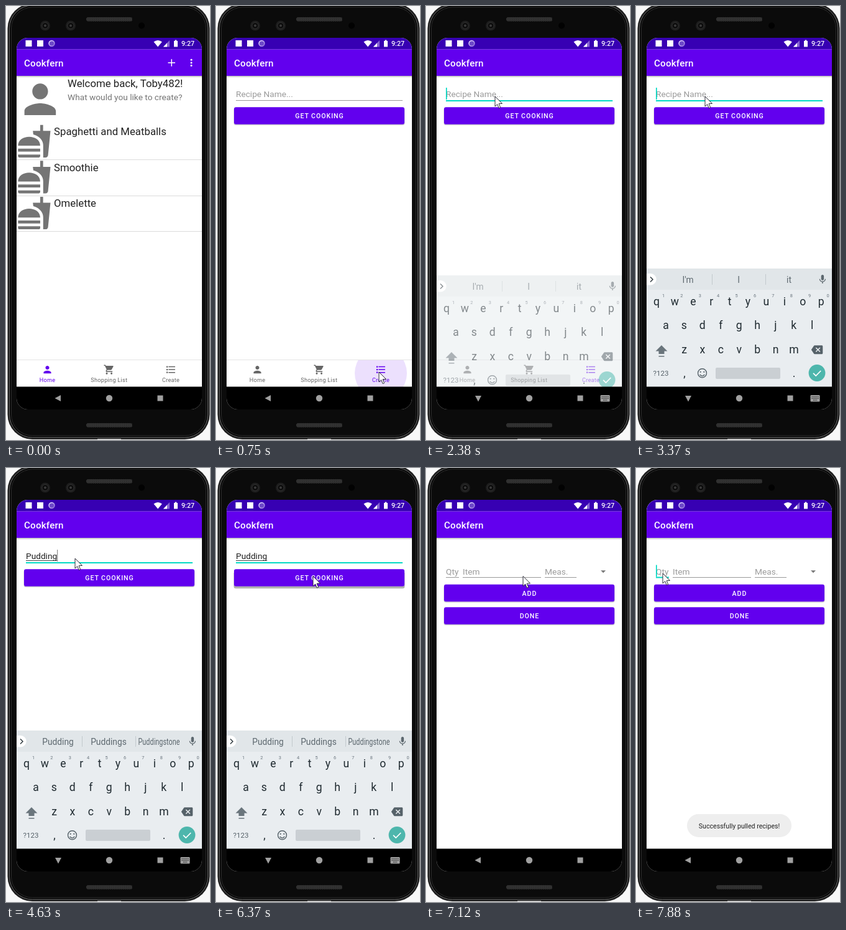
Recreate the animation shown at these times as an HTML page. Size 328 by 696 pixels, loop 8000 ms.

```html
<!DOCTYPE html>
<html lang="en">
<head>
<meta charset="utf-8">
<title>Recipe app</title>
<style>
  html, body { margin: 0; width: 100%; height: 100%; overflow: hidden; background: #fff; }
  svg { display: block; width: 328px; height: 696px; font-family: Roboto, sans-serif; }
  .bar { font-size: 15.18px; font-weight: 500; letter-spacing: .19px; fill: #fff; }
  .big { font-size: 16.8px; fill: #212121; }
  .field { font-size: 13.7px; fill: #212121; }
  .hint { fill: #9b9b9b; }
  .btn text { font-size: 10.62px; font-weight: 500; letter-spacing: .95px; fill: #fff; text-anchor: middle; }
  .btn .shadow { opacity: .18; }
  .pressed .shadow { opacity: .3; transform: translateY(2px); }
  .tab { fill: #666; }
  .tab.on { fill: #6200ee; }
  .tab text { font-size: 9.1px; letter-spacing: .3px; text-anchor: middle; }
  .key { font-size: 17.6px; fill: #1f2a30; text-anchor: middle; }
  .num { font-size: 7.4px; fill: #6a757e; text-anchor: middle; }
  .sug { font-size: 13.8px; fill: #5d686f; text-anchor: middle; }
  .grey { fill: #757575; }
  .line { stroke: #9a9a9a; stroke-width: 1; }
  .focus { stroke: #03dac5; stroke-width: 2; }
</style>
</head>
<body>
<svg viewBox="0 0 328 696">
  <defs>
    <clipPath id="screen"><rect x="17" y="51" width="298" height="596" rx="18"/></clipPath>
    <clipPath id="tabs-area"><rect x="17" y="568" width="298" height="43"/></clipPath>
    <linearGradient id="shade" x2="0" y2="1">
      <stop stop-color="#000" stop-opacity=".28"/><stop offset="1" stop-color="#000" stop-opacity="0"/>
    </linearGradient>
    <linearGradient id="ring" x2="1" y2="1">
      <stop stop-color="#e4dcff"/><stop offset="1" stop-color="#8a68d8"/>
    </linearGradient>
    <pattern id="mesh" width="3" height="3" patternUnits="userSpaceOnUse">
      <rect width="3" height="3" fill="#1c1c1c"/><path d="M0 0l3 3M3 0L0 3" stroke="#555" stroke-width=".6"/>
    </pattern>
    <path id="person" d="M12 12c2.21 0 4-1.79 4-4s-1.79-4-4-4-4 1.79-4 4 1.79 4 4 4zm0 2c-2.67 0-8 1.34-8 4v2h16v-2c0-2.66-5.33-4-8-4z"/>
    <path id="food" d="M18.06 22.99h1.66c.84 0 1.53-.64 1.63-1.46L23 5.05h-5V1h-1.97v4.05h-4.97l.3 2.34c1.71.47 3.31 1.32 4.27 2.26 1.44 1.42 2.43 2.89 2.43 5.29v8.05zM1 21.99V21h15.03v.99c0 .55-.45 1-1.01 1H2.01c-.56 0-1.01-.45-1.01-1zm15.03-7c0-8-15.03-8-15.03 0h15.03zM1.02 17h15v2h-15z"/>
    <path id="cart" d="M7 18c-1.1 0-1.99.9-1.99 2S5.9 22 7 22s2-.9 2-2-.9-2-2-2zM1 2v2h2l3.6 7.59-1.35 2.45c-.16.28-.25.61-.25.96 0 1.1.9 2 2 2h12v-2H7.42c-.14 0-.25-.11-.25-.25l.03-.12.9-1.63h7.45c.75 0 1.41-.41 1.75-1.03l3.58-6.49c.08-.14.12-.31.12-.48 0-.55-.45-1-1-1H5.21l-.94-2H1zm16 16c-1.1 0-1.99.9-1.99 2s.89 2 1.99 2 2-.9 2-2-.9-2-2-2z"/>
    <path id="list" d="M7 5h14v2H7zM7 11h14v2H7zM7 17h14v2H7zM2.5 4.5h3v3h-3zM2.5 10.5h3v3h-3zM2.5 16.5h3v3h-3z"/>
    <g id="appbar">
      <rect x="17" y="51" width="298" height="18.600" fill="#3700b3"/>
      <rect x="17" y="69.600" width="298" height="42.400" fill="#6200ee"/>
      <rect x="17" y="112" width="298" height="3" fill="url(#shade)"/>
      <text class="bar" x="29" y="96.600">Cookfern</text>
    </g>
  </defs>

  <!-- phone body -->
  <rect width="328" height="696" fill="#f8f8f8"/>
  <rect x="2.500" y="-4" width="325" height="699" rx="40" fill="#1e1e1e"/>
  <rect x="5.500" y="-1" width="319" height="693" rx="37" fill="#080808" stroke="#666"/>
  <rect x="8.500" y="2" width="313" height="687" rx="34" fill="#0b0b0b" stroke="#2c2c2c"/>
  <g fill="url(#mesh)">
    <rect x="129" y="18" width="74" height="6.500" rx="3"/>
    <rect x="129" y="669" width="74" height="6.500" rx="3"/>
  </g>
  <g id="cams"></g>
  <circle cx="218" cy="31.500" r="5" fill="#020202"/>
  <path d="M147 695h38" stroke="#ddd" stroke-width="1.500"/>

  <g clip-path="url(#screen)">
    <rect x="17" y="51" width="298" height="596" fill="#fff"/>
    <use href="#appbar"/>

    <g id="home">
      <path d="M260.500 91h11.500M266.250 85.250v11.500" stroke="#fff" stroke-width="1.500"/>
      <g fill="#fff"><circle cx="298" cy="86.300" r="1.500"/><circle cx="298" cy="90.900" r="1.500"/><circle cx="298" cy="95.500" r="1.500"/></g>
      <use href="#person" class="grey" transform="translate(17 111.700) scale(3.160)"/>
      <text class="big" x="99" y="130">Welcome back, Toby482!</text>
      <text class="field grey" x="99" y="151">What would you like to create?</text>
      <g id="rows"></g>
    </g>

    <g id="create">
      <line id="nameLine" x1="32" x2="300"/>
      <text id="name" class="field" x="32" y="146.300"></text>
      <path id="underscore" stroke="#333" stroke-width=".9"/>
      <rect id="caret" y="131" height="19"/>
      <g id="cook"></g>
    </g>

    <g id="tabs" clip-path="url(#tabs-area)">
      <rect x="17" y="568" width="298" height="43" fill="#fff"/>
      <circle id="ripple" cx="265" cy="589" fill="#6200ee" opacity=".12"/>
    </g>
    <rect x="17" y="567" width="298" height="1" fill="#e4e4e4"/>

    <g id="recipe">
      <rect x="17" y="51" width="298" height="560" fill="#fff"/>
      <use href="#appbar"/>
      <g class="field hint">
        <text x="32" y="170.500">Qty</text><text x="59" y="170.500">Item</text><text x="191" y="170.500">Meas.</text>
      </g>
      <path class="line" d="M59 175.500H185M191 175.500H242"/>
      <line id="qtyLine" x1="32" x2="53" y1="175.500" y2="175.500"/>
      <rect id="qtyCaret" x="32" y="155.500" width="1.700" height="19" fill="#03dac5"/>
      <path d="M281 164.200h8l-4 4z" fill="#777"/>
      <g id="actions"></g>
    </g>

    <g id="status" fill="#fff">
      <rect x="31.500" y="55" width="10" height="10"/>
      <rect x="50" y="55" width="10" height="10"/>
      <circle cx="73.500" cy="60" r="4.400" fill="#6c48c8" stroke="url(#ring)" stroke-width="1.700"/>
      <path d="M237.500 57.500q6.700-5 13.400 0L244.200 65.500z"/>
      <path d="M253 65.500h10v-10.500z" opacity=".4"/><path d="M253 65.500h6v-6.300z"/>
      <path d="M270 56h1.700v-1.500h2.600V56h1.700v9.500h-6z"/>
      <text x="282" y="64" font-size="10.700" font-weight="500">9:27</text>
    </g>

    <g id="keyboard">
      <rect x="17" y="421" width="298" height="190" fill="#e9edf0"/>
      <rect x="17" y="421" width="298" height="34" fill="#e1e6e9"/>
      <path d="M17 429h6.500a9.200 9.200 0 0 1 0 18.400H17z" fill="#fff"/>
      <path d="M23 434.500l4 4-4 4" fill="none" stroke="#333d43" stroke-width="1.500"/>
      <path d="M122.500 430v17M208.500 430v17" stroke="#c3c9cd"/>
      <g id="suggestions"></g>
      <path transform="translate(291 429.500) scale(.74)" fill="#5d686f" d="M12 14c1.660 0 3-1.340 3-3V5c0-1.660-1.340-3-3-3S9 3.340 9 5v6c0 1.660 1.340 3 3 3zm5.300-3c0 3-2.540 5.100-5.300 5.100S6.700 14 6.700 11H5c0 3.410 2.720 6.230 6 6.720V21h2v-3.280c3.280-.48 6-3.300 6-6.720z"/>
      <g id="keys"></g>
      <g fill="#566269">
        <path id="shift" d="M41 544l9.500 9.500h-5v4.500h-9v-4.500h-5zM36.500 561h9v1.500h-9z"/>
        <path transform="translate(281.800 542) scale(.77)" d="M22 3H7c-.69 0-1.230.35-1.590.88L0 12l5.410 8.110c.36.53.9.89 1.590.89h15c1.100 0 2-.9 2-2V5c0-1.100-.9-2-2-2zm-3 12.590L17.590 17 14 13.410 10.410 17 9 15.590 12.590 12 9 8.410 10.410 7 14 10.590 17.590 7 19 8.410 15.410 12z"/>
        <circle cx="103.700" cy="586.800" r="1.100"/><circle cx="109.300" cy="586.800" r="1.100"/>
      </g>
      <circle cx="106.500" cy="588.700" r="7" fill="none" stroke="#566269" stroke-width="1.400"/>
      <path d="M102.700 591q3.800 4.600 7.600 0" fill="none" stroke="#566269" stroke-width="1.300"/>
      <rect x="128" y="580" width="104" height="18" rx="2" fill="#cacfd3"/>
      <text class="key" x="40" y="592.800" style="font-size:11.500px;fill:#566269">?123</text>
      <text class="key" x="78" y="595">,</text><text class="key" x="254" y="595">.</text>
      <circle cx="291" cy="588.500" r="13.400" fill="#4db6ac"/>
      <path d="M285 588.800l4.200 4.200 8-8" fill="none" stroke="#fff" stroke-width="1.700"/>
    </g>

    <g id="toast">
      <rect x="82" y="555" width="168" height="37" rx="18.500" fill="#eee"/>
      <text x="166" y="577.500" font-size="10.620" fill="#222" text-anchor="middle">Successfully pulled recipes!</text>
    </g>

    <rect x="17" y="610.500" width="298" height="36.500"/>
    <g fill="#a0a0a0">
      <path id="back" d="M78.500 629l9.500-5v10z"/>
      <circle cx="166" cy="629" r="5.200"/>
      <rect x="243.500" y="624.500" width="9" height="9"/>
      <g id="imeIcon">
        <rect x="280.500" y="624" width="15" height="10.500" rx="1.300"/>
        <path d="M282.500 626.700h11M282.500 629.200h11M285 632h6" stroke="#000" stroke-width="1.100" stroke-dasharray="1.400 1"/>
      </g>
    </g>
  </g>
  <path id="cursor" d="M0 0V16L3.700 12.600 6.200 18.700 8.700 17.700 6.200 11.700 11.500 11.400Z" fill="#fff" stroke="#23232f" stroke-width=".95" stroke-linejoin="round"/>
</svg>
<script>
const LOOP = 8000, TICK = 125;
const $ = id => document.getElementById(id);
const set = (id, attrs) => { for (const k in attrs) $(id).setAttribute(k, attrs[k]); };
const show = (id, on) => { $(id).style.display = on ? '' : 'none'; };
const fill = (id, html) => { $(id).insertAdjacentHTML('beforeend', html); };
const within = (n, a, b) => n >= a && n < b;

// Linear track through [tick, ...values] points
function track(points, n) {
  const i = points.findIndex(p => p[0] >= n);
  if (i === 0) return points[0].slice(1);
  if (i < 0) return points[points.length - 1].slice(1);
  const a = points[i - 1], b = points[i], f = (n - a[0]) / (b[0] - a[0]);
  return a.slice(1).map((v, j) => v + (b[j + 1] - v) * f);
}
// Last entry whose tick has been reached
const latest = (list, n) => list.filter(e => e[0] <= n).pop();

const button = (y, label) => `<g class="btn">
  <rect class="shadow" x="28.500" y="${y + 1.5}" width="275" height="27.500" rx="3.500"/>
  <rect x="29" y="${y}" width="274" height="27.500" rx="3" fill="#6200ee"/>
  <text x="166.500" y="${y + 17.9}">${label}</text></g>`;

fill('cams', [63, 104].map(x => `<circle cx="${x}" cy="31.500" r="8" fill="#1e1e1e"/>
  <circle cx="${x}" cy="31.500" r="5" fill="#0c0c0c" stroke="#333"/><circle cx="${x}" cy="31.500" r="2" fill="#3a3a3a"/>`).join(''));
fill('rows', ['Spaghetti and Meatballs', 'Smoothie', 'Omelette'].map((name, i) => {
  const y = 189 + i * 57.6;
  return `<use href="#food" class="grey" transform="translate(17 ${y - .6}) scale(2.370)"/>
    <text class="big" x="77" y="${y + 18}">${name}</text>
    <path d="M17 ${Math.round(y + 57) + .5}h298" stroke="#dcdcdc"/>`;
}).join(''));
fill('tabs', [['person', 'Home'], ['cart', 'Shopping List'], ['list', 'Create']].map(([icon, label], i) => {
  const x = 66.5 + i * 99.3;
  return `<g class="tab"><use href="#${icon}" transform="translate(${x - 9.1} 574) scale(.759)"/>
    <text x="${x}" y="603">${label}</text></g>`;
}).join(''));
fill('cook', button(162.2, 'GET COOKING'));
fill('actions', button(186.8, 'ADD') + button(223.2, 'DONE'));
fill('keys', [['qwertyuiop', 33, 480.3], ['asdfghjkl', 48, 518], ['zxcvbnm', 77.5, 556.5]].map(([row, x, y], r) =>
  [...row].map((c, i) => `<text class="key letter" x="${x + i * 29.4}" y="${y}">${c}</text>` +
    (r ? '' : `<text class="num" x="${x + 11 + i * 29.4}" y="467">${(i + 1) % 10}</text>`)).join('')).join(''));
fill('suggestions', '<text class="sug"></text>'.repeat(3));

const tabs = [...document.querySelectorAll('.tab')];
const letters = [...document.querySelectorAll('.letter')];
const words = [...document.querySelectorAll('.sug')];

const path = [
  [2, 262, 633], [4, 262, 587], [7, 262, 587], [9, 214, 440], [11, 127, 196], [12, 119, 175],
  [14, 111, 150], [16, 111, 145], [43, 111, 145], [44, 125, 152], [45, 151, 168],
  [46, 156, 168], [48, 156, 168], [49, 156, 171], [50, 156, 173.5], [57, 156, 173.5],
  [59, 98, 176], [61, 46, 172], [62, 43, 169]
];
const typed = [[0, ''], [29, 'P'], [30, 'Pu'], [34, 'Pudd'], [35, 'Puddi'], [36, 'Puddin'], [37, 'Pudding']];
const hints = [
  [0, "I'm", 'I', 'it'], [29, 'P', 'Please', 'Put'], [30, 'Pu', 'Put', 'Push'],
  [34, 'Pudd', 'Pudding', 'Puddle'], [35, 'Puddi', 'Pudding', 'Puddings'],
  [36, 'Puddin', 'Pudding', 'Puddings'], [37, 'Pudding', 'Puddings', 'Puddingstone']
];

function drawForm(n) {
  const text = latest(typed, n)[1], focused = n >= 18;
  const name = $('name');
  name.textContent = text || 'Recipe Name...';
  name.classList.toggle('hint', !text);
  const y = focused ? 152 : 151.5;
  set('nameLine', { class: focused ? 'focus' : 'line', y1: y, y2: y });
  const end = 32 + (text ? name.getComputedTextLength() : 0);
  set('underscore', { d: text ? `M32 148.500H${end}` : '' });
  set('caret', { x: end, width: text ? 1 : 1.7, fill: text ? '#777' : '#03dac5' });
  show('caret', within(n, 18, 23) || within(n, 27, 42) || within(n, 44, 49));
  $('cook').classList.toggle('pressed', n >= 50);
}

function drawKeyboard(n) {
  const [alpha, drop] = track([[18, 0, 20], [19, .55, 11], [20, .93, 3], [21, 1, 0], [55, 1, 0], [56, .5, 9], [57, 0, 18]], n);
  set('keyboard', { opacity: alpha, transform: `translate(0 ${drop})` });
  show('keyboard', alpha > 0);
  const caps = within(n, 28, 30);
  letters.forEach(k => { k.textContent = caps ? k.textContent.toUpperCase() : k.textContent.toLowerCase(); });
  set('shift', { fill: caps ? '#263238' : '#6a757c' });
  latest(hints, n).slice(1).forEach((w, i) => {
    words[i].textContent = w;
    const squeeze = w.length > 10 ? .79 : 1;
    words[i].setAttribute('transform', `translate(${[83.5, 165, 246][i]} 443.700) scale(${squeeze} 1)`);
  });
  const open = within(n, 19, 56);
  set('back', { transform: open ? 'rotate(-90 84 629)' : '' });
  show('imeIcon', open);
}

function drawRecipe(n) {
  const [alpha, drop] = track([[52, 0, 24], [53, .3, 22], [54, .75, 14], [55, .98, 5.7], [56, 1, 0]], n);
  show('recipe', alpha > 0);
  set('recipe', { opacity: alpha, transform: `translate(0 ${drop})` });
  const focused = n >= 63;
  set('qtyLine', { class: focused ? 'focus' : 'line' });
  show('qtyCaret', focused);
  set('toast', { opacity: track([[57, 0], [59, 1]], n)[0] });
}

function draw(n) {
  const creating = n >= 6;
  show('home', !creating);
  show('create', creating);
  tabs.forEach((t, i) => t.classList.toggle('on', i === (creating ? 2 : 0)));
  set('ripple', { r: track([[4, 0], [5, 24], [6, 42]], n)[0] });
  show('ripple', within(n, 5, 7));
  if (creating) drawForm(n);
  drawKeyboard(n);
  drawRecipe(n);
  show('cursor', n >= 2);
  set('cursor', { transform: `translate(${track(path, n)})` });
}

// The picture advances in even steps, so time is snapped to them
const start = performance.now();
let last = -1;
function loop() {
  const t = (performance.now() - start) % LOOP;
  const n = Math.floor((t + 10) / TICK) % (LOOP / TICK);
  if (n !== last) draw(last = n);
  requestAnimationFrame(loop);
}
loop();
</script>
</body>
</html>
```
